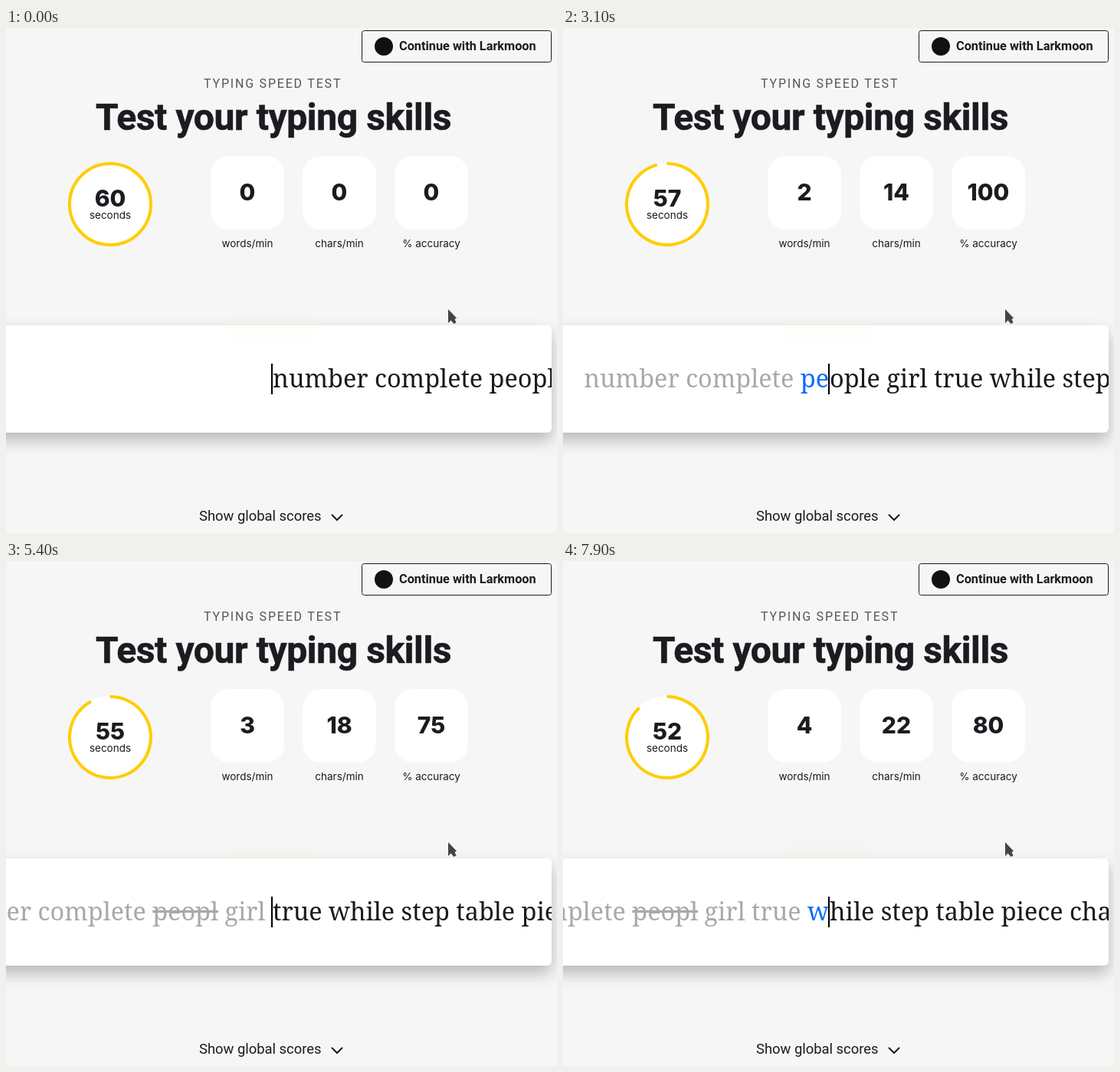
Write an HTML page that moves like this. It is 719 by 659 pixels and loops after 8 s.

```html
<!DOCTYPE html>
<html lang="en">
<head>
<meta charset="utf-8">
<title>Typing speed test</title>
<style>
  html, body { margin: 0; width: 100%; height: 100%; overflow: hidden; background: #f6f6f6; }
  svg { display: block; width: 719px; height: 659px; font-family: Roboto, sans-serif; fill: #1b1b20; }
  .title { font-weight: 700; font-size: 48px; letter-spacing: -.4px; stroke: #1b1b20; stroke-width: .6px; }
  .number { font: 800 30px Inter, sans-serif; text-anchor: middle; }
  .label { font: 13.5px Inter, sans-serif; text-anchor: middle; }
  .words { font: 300 32.4px "Noto Serif", serif; white-space: pre; fill: #1a1a1c; }
  .done { fill: #a9a9a9; }
  .current { fill: #0a6cff; }
  .wrong { text-decoration: line-through; }
  .card { fill: #fff; filter: drop-shadow(0 10px 10px rgba(0, 0, 0, .25)); }
</style>
</head>
<body>
<svg viewBox="0 0 719 659">
  <clipPath id="cardClip"><rect y="388" width="712" height="140"/></clipPath>

  <rect x="464.5" y="3.5" width="247" height="41" rx="3" fill="none" stroke="#1b1b20"/>
  <circle cx="493" cy="24" r="12" fill="#111"/>
  <text x="513" y="29" font-size="16.3" font-weight="700">Continue with Larkmoon</text>

  <text x="258" y="78" font-size="16" letter-spacing="1.8" fill="#55555c">TYPING SPEED TEST</text>
  <text class="title" x="117" y="133">Test your typing skills</text>

  <circle cx="136" cy="230" r="54" fill="#fff"/>
  <path id="ring" fill="none" stroke="#ffcd00" stroke-width="4" stroke-linecap="round"/>
  <text class="number" id="seconds" x="136" y="233"></text>
  <text class="label" x="136" y="249">seconds</text>
  <g id="stats"></g>

  <rect class="card" x="-20" y="388" width="732" height="140" rx="6"/>
  <rect id="hint" x="291" width="112" height="30" rx="4" fill="#efe3a0" opacity=".04"/>
  <g clip-path="url(#cardClip)">
    <text class="words" id="typed" x="347" y="469" text-anchor="end"></text>
    <text class="words" id="rest" x="348" y="469"></text>
    <rect id="caret" x="346" y="438" width="2" height="40" fill="#000"/>
  </g>

  <text x="252" y="643" font-size="18.4">Show global scores</text>
  <path d="M425.500 635.500l6.500 6.500 6.500-6.500" fill="none" stroke="#1b1b20" stroke-width="2" stroke-linecap="round"/>
  <path d="M577 367v18l3.500-3.500 4 4.500 3-1.500-2-4.500 2.500-1.500z" fill="#444"/>
</svg>
<script>
const LOOP = 8000, CLOCK_START = 650, DURATION = 60;
const WORDS = 'number complete people girl true while step table piece change'.split(' ');
// Bursts of typing: start, interval, keys ("<" is backspace).
const BURSTS = [
  [300, 115, 'number '], [1200, 100, 'complete'], [2200, 0, ' '],
  [2700, 250, 'peo'], [3700, 200, 'pl'], [4300, 0, ' '], [4600, 175, 'girl '],
  [5700, 300, 'tur'], [6700, 200, '<<'], [7200, 150, 'rue '], [7900, 0, 'w'],
];
const KEYS = BURSTS.flatMap(([start, gap, keys]) =>
  [...keys].map((key, i) => ({ key, at: start + i * gap })));

const $ = id => document.getElementById(id);

$('stats').innerHTML = ['words/min', 'chars/min', '% accuracy'].map((label, i) => {
  const x = 315 + i * 120;
  return `<rect x="${x - 48}" y="167" width="96" height="96" rx="24" fill="#fff"/>
    <text class="number" x="${x}" y="225"></text>
    <text class="label" x="${x}" y="286">${label}</text>`;
}).join('');
const statTexts = $('stats').querySelectorAll('.number');

function typingAt(time) {
  const done = [];
  let current = '';
  for (const { key, at } of KEYS) {
    if (at > time) break;
    if (key === ' ') {
      done.push(current);
      current = '';
    } else {
      current = key === '<' ? current.slice(0, -1) : current + key;
    }
  }
  return { done, current };
}

function ringPath(elapsed) {
  const point = degrees => {
    const a = degrees * Math.PI / 180;
    return `${136 + 53 * Math.sin(a)} ${230 - 53 * Math.cos(a)}`;
  };
  if (elapsed <= 0) return `M${point(0)}A53 53 0 1 1 ${point(180)}A53 53 0 1 1 ${point(0)}`;
  const end = 358.4 - elapsed * 360 / DURATION;
  return `M${point(1.2)}A53 53 0 1 1 ${point(end)}`;
}

function drawWords({ done, current }) {
  const target = WORDS[done.length];
  let matched = 0;
  while (matched < current.length && current[matched] === target[matched]) matched++;
  const left = target.slice(matched);

  const span = (word, kind, wrong) =>
    `<tspan class="${kind}${wrong ? ' wrong' : ''}">${word}</tspan>`;
  $('typed').innerHTML =
    done.map((word, i) => span(word, 'done', word !== WORDS[i]) + ' ').join('') +
    span(current, 'current', matched < current.length);
  $('rest').textContent = [left, ...WORDS.slice(done.length + 1)].join(' ');
  $('caret').style.display = left ? '' : 'none';
}

function drawStats(done) {
  const correct = done.filter((word, i) => word === WORDS[i]);
  const accuracy = done.length ? Math.round(100 * correct.length / done.length) : 0;
  [correct.length, correct.join('').length, accuracy].forEach((value, i) => {
    statTexts[i].textContent = value;
  });
}

// The picture advances in tenths of a second, with two short holds.
function steppedTime(ms) {
  if (ms < 300) return 0;
  if (ms >= 2400 && ms < 2700) return 2400;
  return Math.floor(ms / 100) * 100;
}

function draw() {
  const time = steppedTime(performance.now() % LOOP);
  const elapsed = (time - CLOCK_START) / 1000;
  const typing = typingAt(time);
  $('ring').setAttribute('d', ringPath(elapsed));
  $('seconds').textContent = Math.min(DURATION, Math.floor(DURATION - elapsed));
  $('hint').setAttribute('y', 375 - 9 * Math.cos((time - 2000) / 3000 * 2 * Math.PI));
  drawWords(typing);
  drawStats(typing.done);
  requestAnimationFrame(draw);
}
draw();
</script>
</body>
</html>
```
